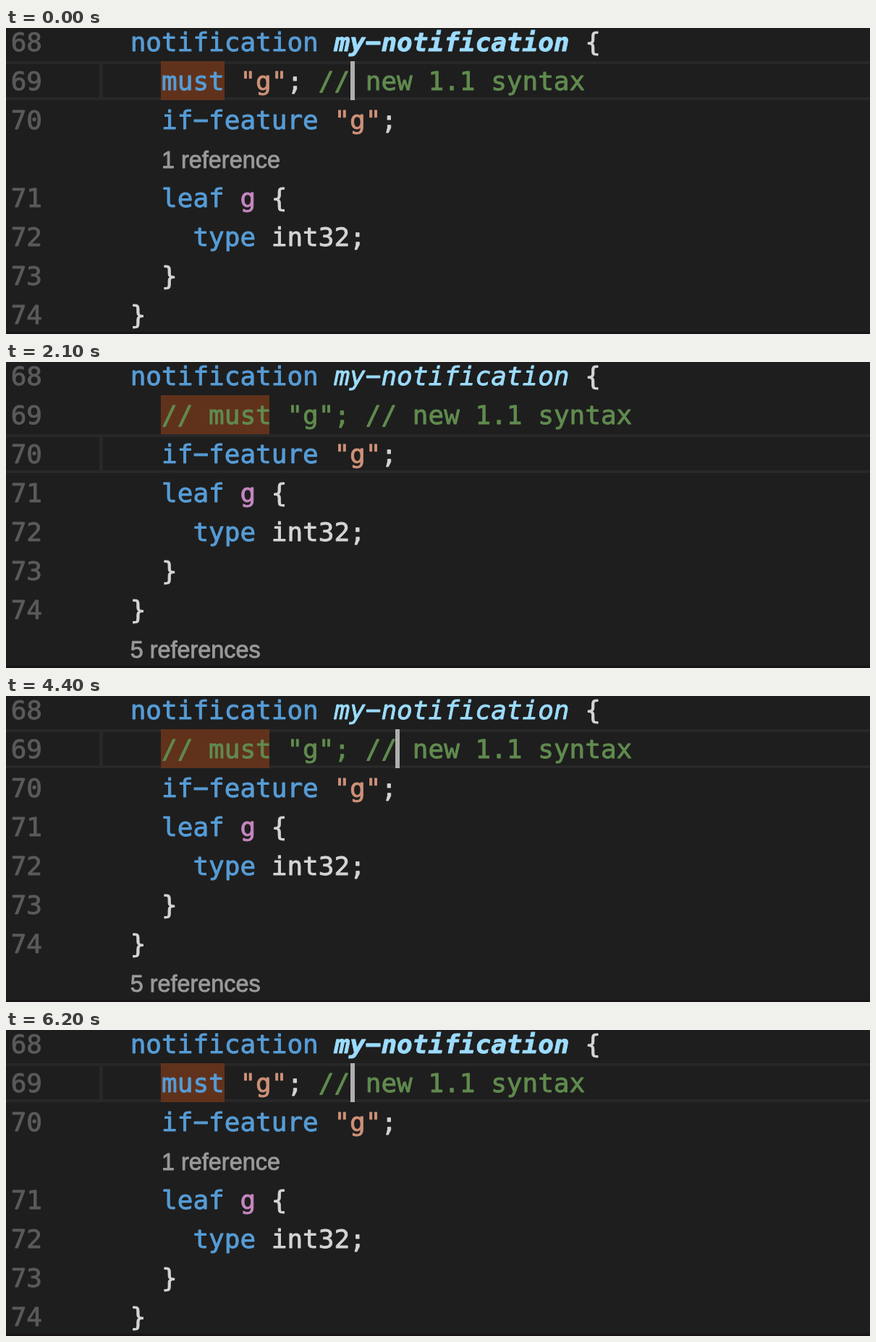
Write an HTML page with a canvas that moves like this. It is 1194 px wide and 424 px high and loops after 6300 ms.

```html
<!DOCTYPE html>
<html lang="en">
<head>
<meta charset="utf-8">
<title>Commenting out lines in an editor</title>
<style>
  html, body { margin: 0; width: 100%; height: 100%; overflow: hidden; background: #1e1e1e; }
  canvas { display: block; }
</style>
</head>
<body>
<canvas id="stage" width="1194" height="424"></canvas>
<script>
const ctx = document.getElementById('stage').getContext('2d');

const LOOP = 6300, BLINK = 500;
const LINE_HEIGHT = 54, FIRST_TOP = -8, BASELINE = 40;
const NUMBER_X = 6.7, CODE_X = 171.7, COLUMN = 21.67;
const STEM_GAIN = 0.9;
const CODE_FONT = '36px "DejaVu Sans Mono", monospace';
const LENS_FONT = '32.4px "Liberation Sans", Arial, sans-serif';
const COLOR = {
  background: '#1e1e1e', number: '#5a5a5a', border: '#282828', match: '#61321b',
  keyword: '#569cd6', string: '#ce9178', comment: '#608b4e', name: '#9cdcfe',
  leaf: '#c586c0', plain: '#d4d4d4', lens: '#999999', cursor: '#aeafad', edge: '#191417'
};
const NAME_STYLES = ['', 'italic ', 'italic bold '];

// Editor state at the start of the loop; the cursor has been blinking since 'touched'.
const initial = {
  mustOff: false, featureOff: false, styleLevel: 2, lens: true,
  row: 1, cursorX: 476, touched: 5150 - LOOP
};

// Changes that set 'touched' also restart the cursor blink.
const edits = [
  { at: 200, mustOff: true, cursorX: 538, touched: 200 },
  { at: 300, styleLevel: 1 },
  { at: 500, lens: false, touched: 500 },
  { at: 1400, row: 2, cursorX: 538, touched: 1400 },
  { at: 2400, featureOff: true, cursorX: 604, touched: 2400 },
  { at: 2800, styleLevel: 0 },
  { at: 3300, featureOff: false, cursorX: 538, touched: 3300 },
  { at: 3600, styleLevel: 1 },
  { at: 4000, row: 1, cursorX: 538, touched: 4000 },
  { at: 4500, mustOff: false, cursorX: 476, touched: 4500 },
  { at: 4800, styleLevel: 2 },
  { at: 5150, lens: true, touched: 5150 }
];

function stateAt(time) {
  return Object.assign({}, initial, ...edits.filter(edit => edit.at <= time));
}

function rect(x, y, width, height, color) {
  ctx.fillStyle = color;
  ctx.fillRect(x, y, width, height);
}

// The thin outline gives the heavier stems of smoothed light-on-dark text.
function text(string, x, y, color, font = CODE_FONT) {
  ctx.font = font;
  ctx.fillStyle = ctx.strokeStyle = color;
  ctx.lineWidth = STEM_GAIN;
  ctx.lineJoin = 'round';
  ctx.fillText(string, x, y);
  ctx.strokeText(string, x, y);
}

const rowTop = row => FIRST_TOP + row * LINE_HEIGHT;

// Tokens are [text, color kind, optional font style].
function codeRow(row, number, indent, tokens) {
  const y = rowTop(row) + BASELINE;
  let column = indent;
  text(number, NUMBER_X, y, COLOR.number);
  for (const [string, kind, style = ''] of tokens) {
    // The minus sign gives the wide hyphen of the editor font.
    text(string.replace(/-/g, '\u2212'), CODE_X + column * COLUMN, y, COLOR[kind], style + CODE_FONT);
    column += string.length;
  }
}

function lensRow(row, indent, string) {
  text(string, CODE_X + indent * COLUMN, rowTop(row) + BASELINE, COLOR.lens, LENS_FONT);
}

function currentLine(row) {
  const top = rowTop(row);
  rect(0, top, 1194, 4, COLOR.border);
  rect(0, top + 50, 1194, 4, COLOR.border);
  rect(129, top + 4, 5, 46, COLOR.border);
}

function draw(time) {
  const state = stateAt(time);
  rect(0, 0, 1194, 424, COLOR.background);
  currentLine(state.row);
  rect(214, rowTop(1), state.mustOff ? 150 : 88, LINE_HEIGHT, COLOR.match);

  codeRow(0, 68, 0, [
    ['notification ', 'keyword'],
    ['my-notification', 'name', NAME_STYLES[state.styleLevel]],
    [' {', 'plain']
  ]);
  codeRow(1, 69, 2, state.mustOff
    ? [['// must "g"; // new 1.1 syntax', 'comment']]
    : [['must ', 'keyword'], ['"g"', 'string'], ['; ', 'plain'], ['// new 1.1 syntax', 'comment']]);
  codeRow(2, 70, 2, state.featureOff
    ? [['// if-feature "g";', 'comment']]
    : [['if-feature ', 'keyword'], ['"g"', 'string'], [';', 'plain']]);

  const next = state.lens ? 4 : 3;
  if (state.lens) lensRow(3, 2, '1 reference');
  codeRow(next, 71, 2, [['leaf ', 'keyword'], ['g', 'leaf'], [' {', 'plain']]);
  codeRow(next + 1, 72, 4, [['type ', 'keyword'], ['int32;', 'plain']]);
  codeRow(next + 2, 73, 2, [['}', 'plain']]);
  codeRow(next + 3, 74, 0, [['}', 'plain']]);
  if (!state.lens) lensRow(7, 0, '5 references');

  if ((time - state.touched) % (2 * BLINK) < BLINK) {
    rect(state.cursorX, rowTop(state.row), 6, LINE_HEIGHT, COLOR.cursor);
  }
  rect(0, 421, 1194, 3, COLOR.edge);
}

function tick() {
  draw(performance.now() % LOOP);
  requestAnimationFrame(tick);
}
tick();
</script>
</body>
</html>
```
